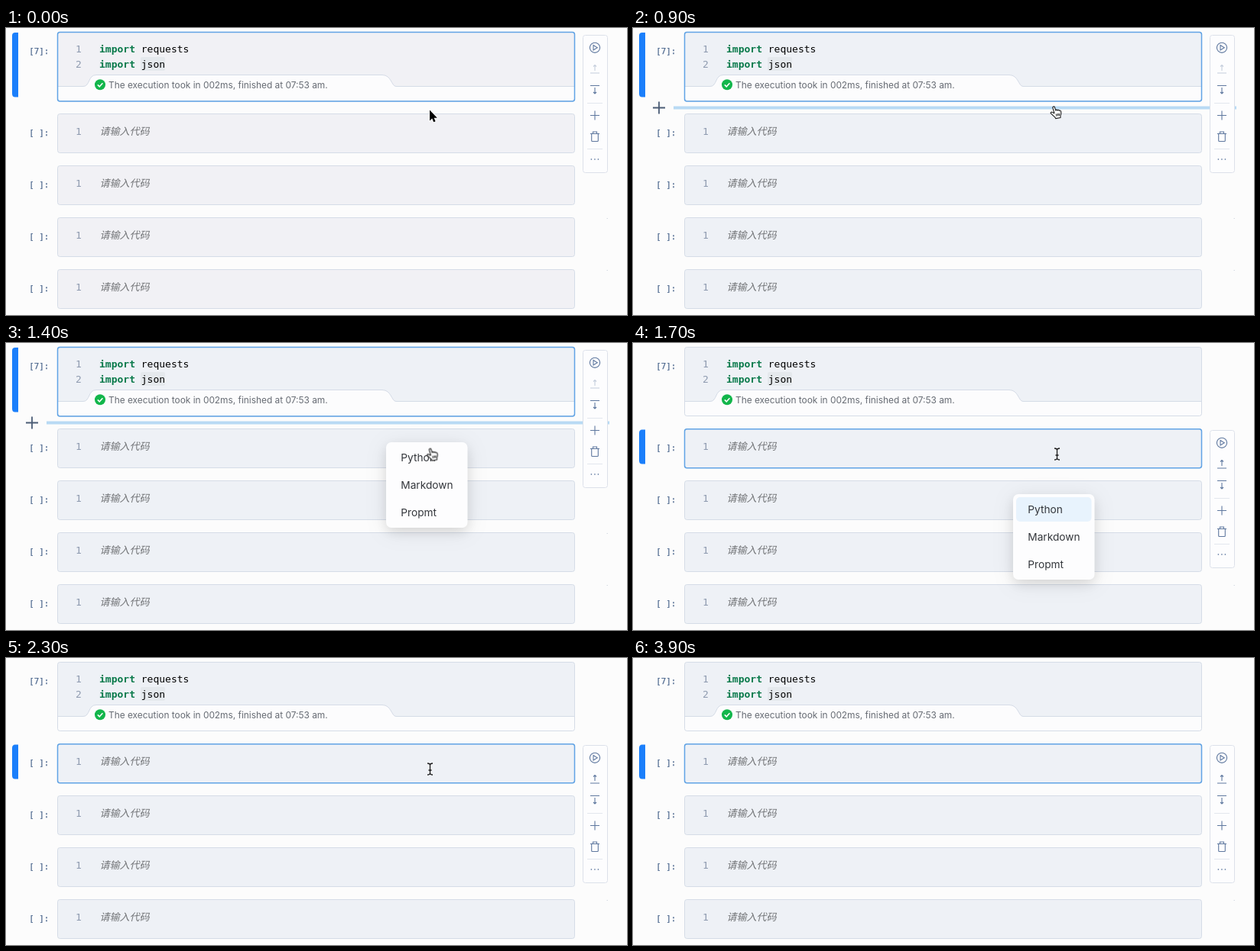
Recreate the animation shown at these times as an HTML page. Size 812x376 px, loop 4 s.

```html
<!DOCTYPE html>
<html lang="zh">
<head>
<meta charset="utf-8">
<title>Notebook: insert a cell</title>
<style>
html, body { margin: 0; width: 100%; height: 100%; overflow: hidden; background: #fcfcfc; }
svg { display: block; width: 812px; height: 376px; }

text { font: 13px "DejaVu Sans Mono", monospace; fill: #000; }
.prompt { font-size: 10.8px; fill: #4f6a8f; stroke: #4f6a8f; stroke-width: .25; }
.num { fill: #8f9bb0; }
.kw { font-weight: bold; fill: #08794a; }
.hint { font: italic 500 13px "Noto Sans CJK SC", "Noto Sans CJK", sans-serif; fill: #717376; }
.status { font: 11.88px Inter, sans-serif; fill: #666b73; }
.item { font: 13.7px Inter, sans-serif; fill: #33363b; }

.frame { fill: none; stroke: #d5dce7; }
.focus { fill: none; stroke: #60a3e5; stroke-width: 1.5; }
.icon { fill: none; stroke: #5f789f; stroke-width: 1.1; }
.rule { stroke: #e3e7ee; }
.menu-box { fill: #fdfdfe; filter: drop-shadow(0 6px 8px rgba(0,0,0,.1)) drop-shadow(0 4px 14px rgba(0,0,0,.08)); }

/* hard switches */
.bg, .step { animation: 4s step-end infinite; }
.bg { fill: #eef1f6; animation-name: tint; }
.first { animation-name: first; }
.second { animation-name: second; }
.gap { animation-name: gap; }
.up { animation-name: up; }
.tools { animation-name: tools; }
.hover { animation-name: hover; }
.arrow { animation-name: arrow; }
.hand { animation-name: hand; }
.beam { animation-name: beam; }
.drop { animation-name: drop; }

/* smooth motion */
.travel { animation: travel 4s linear infinite; }
.menu { animation: menu 4s linear infinite; transform-origin: 550px 130px; }

@keyframes tint { 0% { fill: #f1f1f5; } 2.5%, 100% { fill: #eef1f6; } }
@keyframes first { 0% { opacity: 1; } 40%, 100% { opacity: 0; } }
@keyframes second { 0% { opacity: 0; } 40%, 100% { opacity: 1; } }
@keyframes gap { 0% { opacity: 0; } 5% { opacity: 1; } 40%, 100% { opacity: 0; } }
@keyframes up { 0% { opacity: .35; } 40%, 100% { opacity: 1; } }
@keyframes tools { 0% { transform: none; } 40%, 100% { transform: translateY(105px); } }
@keyframes drop { 0% { transform: none; } 40%, 100% { transform: translateY(68px); } }
@keyframes hover { 0% { opacity: 0; } 37.5%, 100% { opacity: 1; } }
@keyframes arrow { 0% { opacity: 1; } 5%, 100% { opacity: 0; } }
@keyframes hand { 0% { opacity: 0; } 5% { opacity: 1; } 40%, 100% { opacity: 0; } }
@keyframes beam { 0% { opacity: 0; } 40% { opacity: 1; } 72.5%, 100% { opacity: 0; } }
@keyframes travel {
  0%, 29% { transform: translate(545px, 102px); animation-timing-function: ease-in-out; }
  34.5%, 100% { transform: translate(549.5px, 137.5px); }
}
@keyframes menu {
  0%, 27.5% { opacity: 0; transform: scaleY(.8); animation-timing-function: ease-out; }
  32%, 47.5% { opacity: 1; transform: none; }
  52%, 100% { opacity: 0; transform: scaleY(.8); }
}
</style>
</head>
<body>
<svg viewBox="0 0 812 376">
  <defs>
    <g id="cell">
      <rect class="bg" x="67.5" y="112.5" width="676" height="51" rx="3"/>
      <rect class="frame" x="67.5" y="112.5" width="676" height="51" rx="3"/>
      <text class="prompt" x="30.3" y="140.8">[ ]:</text>
      <text class="num" x="91" y="140">1</text>
      <text class="hint" x="122.4" y="139.7">请输入代码</text>
    </g>
  </defs>

  <rect class="bg" x="67.5" y="5.5" width="676" height="90" rx="3"/>
  <path d="M68 76.5H101C110 76.5 107 61.5 118 61.5H492C504 61.5 504 76.5 510 76.5H743V95H68Z" fill="#fcfcfd"/>
  <path class="frame" d="M68 76.5H101C110 76.5 107 61.5 118 61.5H492C504 61.5 504 76.5 510 76.5H743"/>
  <rect class="frame" x="67.5" y="5.5" width="676" height="90" rx="3"/>
  <text class="prompt" x="30.3" y="33.5">[7]:</text>
  <text class="num" x="91" y="32">1</text>
  <text class="num" x="91" y="52">2</text>
  <rect x="176" y="38" width="32" height="18" rx="2" fill="#e5e9ed"/>
  <text x="122" y="32"><tspan class="kw">import</tspan> requests</text>
  <text x="122" y="52"><tspan class="kw">import</tspan> json</text>
  <circle cx="123" cy="74.3" r="7" fill="#12b64b"/>
  <path d="M119.8 74.4l2.4 2.4 4.2-4.5" fill="none" stroke="#fff" stroke-width="1.5"/>
  <text class="status" x="134" y="78.6">The execution took in 002ms, finished at 07:53 am.</text>

  <use href="#cell"/>
  <use href="#cell" y="68"/>
  <use href="#cell" y="136"/>
  <use href="#cell" y="204"/>
  <path d="M785.5 249.5h1.5M785.5 317.5h1.5" stroke="#d5dae2"/>

  <g class="step first">
    <rect class="focus" x="67.5" y="5.5" width="676" height="90.5" rx="3"/>
    <path d="M16 6V90.5H12Q8 90.5 8 86V10Q8 6 12 6Z" fill="#1b7ffb"/>
  </g>
  <g class="step second">
    <rect class="focus" x="67.5" y="112.8" width="676" height="51" rx="3"/>
    <path d="M16 113.5V158.5H12Q8 158.5 8 154V118Q8 113.5 12 113.5Z" fill="#1b7ffb"/>
  </g>

  <g class="step gap">
    <path d="M53 104.5H789" stroke="#b8daf4" stroke-width="4"/>
    <path d="M26 104.5H42M34 96.5V112.5" stroke="#4b5c75" stroke-width="1.8"/>
  </g>

  <g class="step tools">
    <rect x="754.5" y="9.5" width="32" height="180" rx="3" fill="#fdfdfe" stroke="#dce1ea"/>
    <path class="rule" d="M760 98.5H780M760 158.5H780"/>
    <g class="icon">
      <circle cx="770" cy="25.8" r="6.6"/>
      <path d="M768 22.6V29L773.2 25.8Z"/>
      <path class="step up" d="M764 59H776M770 56V48.5M768 50.5L770 48.5L772 50.5"/>
      <path d="M764 75.5H776M770 78V86M768 84L770 86L772 84"/>
      <path d="M764 114.5H776M770 108.5V120.5"/>
      <path d="M764 138.5H776M765.7 138.5V147.5Q765.7 148.5 766.7 148.5H773.3Q774.3 148.5 774.3 147.5V138.5M767.5 138V136H772.5V138"/>
    </g>
    <path d="M764.7 172h1.4m3.1 0h1.4m3.1 0h1.4" stroke="#5f789f" stroke-width="1.3"/>
  </g>

  <g class="step drop">
    <g class="menu">
      <rect class="menu-box" x="497" y="130" width="106.5" height="112" rx="7"/>
      <rect class="step hover" x="501" y="134" width="98.5" height="32" rx="5" fill="#e8f3fd"/>
      <text class="item" x="516.3" y="155">Python</text>
      <text class="item" x="516.3" y="191">Markdown</text>
      <text class="item" x="516.3" y="227">Propmt</text>
    </g>
  </g>

  <g class="step arrow">
    <path transform="translate(554 107.5)" d="M0 0V14L3.2 11L5.2 15.8L7.6 14.8L5.6 10.2H9.8Z" stroke="#fff" stroke-width="1.6" paint-order="stroke"/>
  </g>
  <g class="step hand">
    <path class="travel" d="M6 10L3.9 2.6C3.5.8 5.9.2 6.4 1.9L7.7 6C8 4.9 9.8 4.8 10.1 6C10.7 5 12.2 5.2 12.5 6.4C13.3 5.7 14.5 6.2 14.6 7.4C14.9 9.5 15 11 13.9 13L14 15.5L7.6 16.6L6.9 15C5 13.8 3.5 11.8 1.6 10.2C.4 9 1.8 7.6 3.3 8.4L6 10M8.3 10.5l.6 3M10.3 10.2l.5 3M12.2 9.8l.3 3" fill="#fff" stroke="#1c1c1c" stroke-width="1.1" stroke-linejoin="round"/>
  </g>
  <g class="step beam">
    <path d="M551 138Q554.5 138 554.5 140.5Q554.5 138 558 138M554.5 140V151M552.5 147H556.5M551 153Q554.5 153 554.5 150.5Q554.5 153 558 153" fill="none" stroke="#1c1c1c" stroke-width="1.3"/>
  </g>
</svg>
</body>
</html>
```
